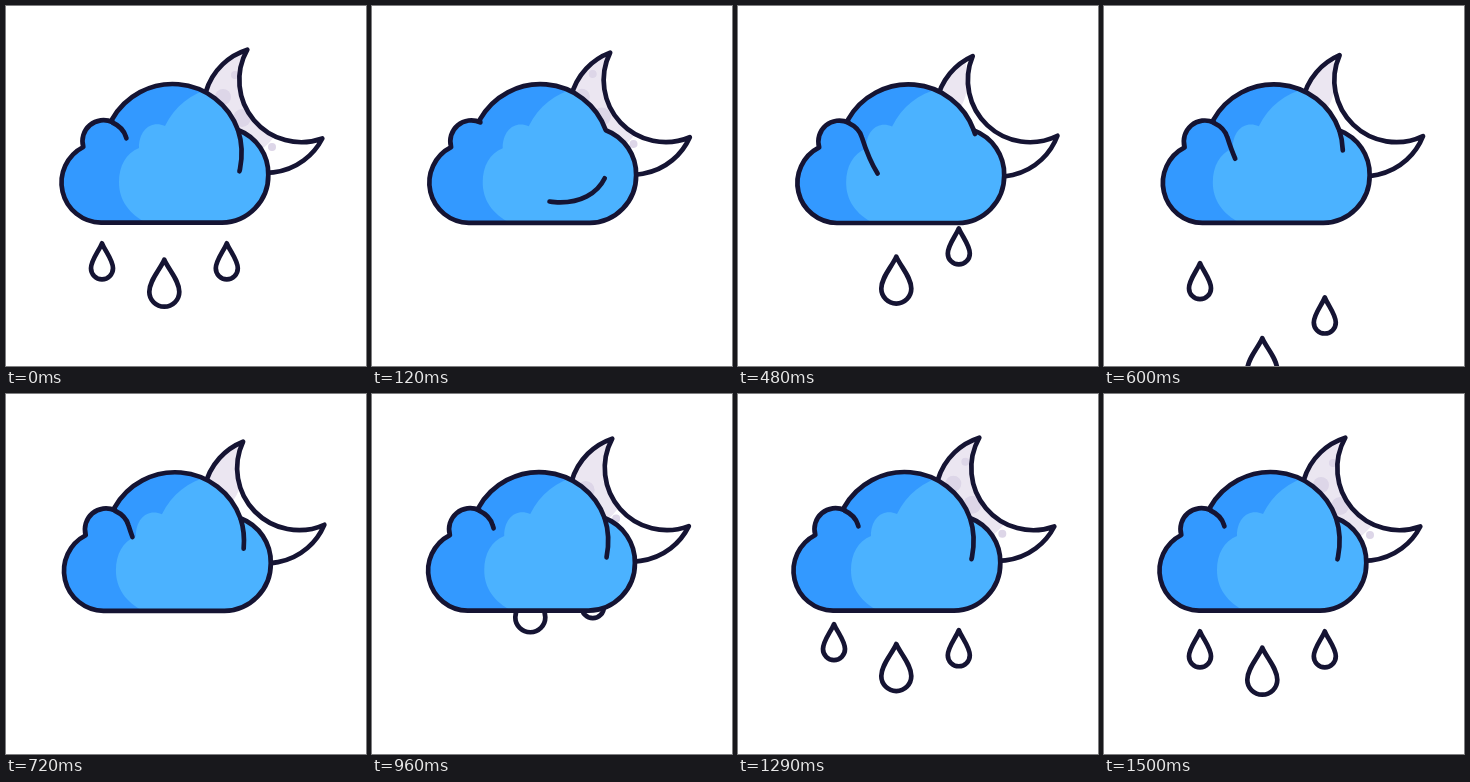
Recreate the animation shown at these times as an HTML page with a canvas. Size 360x360 px, loop 3.09 s.

```html
<!DOCTYPE html>
<html lang="en">
<head>
<meta charset="utf-8">
<title>Night rain</title>
<style>
  html, body { margin: 0; width: 100%; height: 100%; overflow: hidden; background: #fff; }
  canvas { display: block; width: 360px; height: 360px; }
</style>
</head>
<body>
<canvas id="stage" width="360" height="360"></canvas>
<script>
const LOOP = 3090, END = 1500, STEP = 30;
const INK = '#151433', BLUE = '#3399ff', SKY = '#4bb2ff', LILAC = '#ebe6f1', CRATER = '#ddd6e8';

const canvas = document.getElementById('stage');
const ratio = window.devicePixelRatio || 1;
canvas.width = canvas.height = 360 * ratio;
const ctx = canvas.getContext('2d');

const cloud = new Path2D(
  'M95 216.600A40 40 0 0 1 77.300 141A21 21 0 0 1 106.500 116.200L106 113.500' +
  'A69.500 69.500 0 0 1 232 124A47 47 0 0 1 262.300 169A47 47 0 0 1 216 216.600Z');
const light = new Path2D(
  'M207 82C185 87 169 100 159 120C145 114 133 124 133 142' +
  'C120 147 113 160 113 176C113 196 125 210 145 219H290V82Z');
const moon = new Path2D('M241.300 43.700A62 62 0 0 0 316.300 132.500A63 63 0 1 1 241.300 43.700Z');

// The crease is one long curve; a single dash slides along it and wraps round.
const creaseData = 'M106.500 116.500C114 120 118 124 120 131C127 153 141 193 181 196' +
  'C212 198 230 182 234 163C236.500 150 236 136 232 124';
const crease = new Path2D(creaseData);
const probe = document.createElementNS('http://www.w3.org/2000/svg', 'path');
probe.setAttribute('d', creaseData);
const creaseLength = probe.getTotalLength();

const craters = [[217, 91, 8], [236, 112, 9], [266, 141, 4], [229, 69, 4]];

// rest: centre of the round part; first fall (start, time), then landing time
const drops = [
  { x: 96, rest: 262.3, r: 11, h: 25, start: 340, fall: 375, land: 1438 },
  { x: 158.3, rest: 285.7, r: 15, h: 32, start: 109, fall: 534, land: 1395 },
  { x: 220.8, rest: 262.3, r: 11, h: 25, start: 175, fall: 534, land: 1346 }
];

const clamp = v => Math.max(0, Math.min(1, v));
const easeSine = u => (1 - Math.cos(Math.PI * clamp(u))) / 2;
const back = (t, peak, end) => 1 - easeSine((t - peak) / (end - peak));

function outline(path, fill) {
  if (fill) {
    ctx.fillStyle = fill;
    ctx.fill(path);
  }
  ctx.stroke(path);
}

function disc(x, y, r, color) {
  ctx.fillStyle = color;
  ctx.beginPath();
  ctx.arc(x, y, r, 0, Math.PI * 2);
  ctx.fill();
}

function drawMoon(sway, shade) {
  ctx.save();
  ctx.translate(294, 104);
  ctx.rotate(-6.8 * sway * Math.PI / 180);
  ctx.translate(-294, -104);
  ctx.fillStyle = '#fff';
  ctx.fill(moon);
  ctx.save();
  ctx.clip(moon);
  ctx.translate(-46 * shade, -36 * shade);
  disc(220, 95, 60, LILAC);
  craters.forEach(([x, y, r]) => disc(x, y, r, CRATER));
  ctx.restore();
  outline(moon);
  ctx.restore();
}

// Offset from the resting place, or null while out of sight.
function dropShift(d, t) {
  if (t < STEP || t >= d.land) return 0;
  if (t >= 760) return -3.3e-4 * (d.land - t) ** 2;
  const u = (t - d.start) / d.fall;
  return u < 0 || u > 1 ? null : 174 - d.rest + 225 * u * u;
}

function drawDrop(d, t) {
  const shift = dropShift(d, t);
  if (shift === null || d.rest + shift < 170) return;
  const { r, h } = d;
  const p = new Path2D();
  p.moveTo(0, -h);
  p.bezierCurveTo(r * 0.3, -h * 0.68, r, -r * 0.75, r, 0);
  p.arc(0, 0, r, 0, Math.PI);
  p.bezierCurveTo(-r, -r * 0.75, -r * 0.3, -h * 0.68, 0, -h);
  p.closePath();
  ctx.save();
  ctx.translate(d.x, d.rest + shift);
  outline(p, '#fff');
  ctx.restore();
}

function drawCloud(sway, travel) {
  ctx.save();
  ctx.translate(4 * sway, 0.4 * sway);
  ctx.fillStyle = BLUE;
  ctx.fill(cloud);
  ctx.save();
  ctx.clip(cloud);
  ctx.translate(-9 * sway, 0);
  ctx.fillStyle = SKY;
  ctx.fill(light);
  ctx.restore();
  outline(cloud);
  const dash = 64;
  ctx.setLineDash([dash, creaseLength - dash]);
  ctx.lineDashOffset = 42 + creaseLength * travel;
  outline(crease);
  ctx.restore();
}

function draw(now) {
  const t = Math.min(END, Math.floor(now % LOOP / STEP) * STEP);
  const sway = t < 400 ? Math.sin(Math.PI / 2 * t / 400) : back(t, 400, 1150);
  const shade = t < 500 ? easeSine(t / 500) : back(t, 500, 1400);
  const travel = 1 - (1 - t / END) ** 4.6;

  ctx.setTransform(ratio, 0, 0, ratio, 0, 0);
  ctx.fillStyle = '#fff';
  ctx.fillRect(0, 0, 360, 360);
  ctx.strokeStyle = INK;
  ctx.lineWidth = 4.7;
  ctx.lineCap = ctx.lineJoin = 'round';
  drawMoon(sway, shade);
  drops.forEach(d => drawDrop(d, t));
  drawCloud(sway, travel);
}

const begin = performance.now();
function tick() {
  draw(performance.now() - begin);
  requestAnimationFrame(tick);
}
tick();
</script>
</body>
</html>
```
